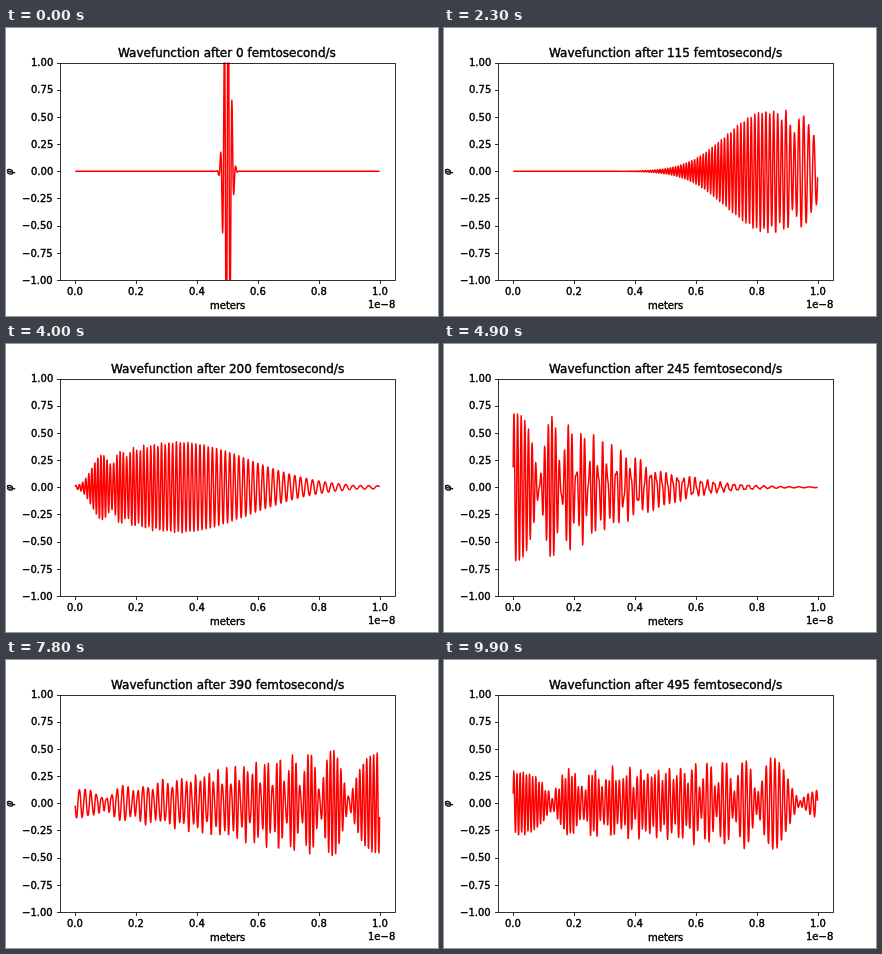
Animation of 432x288 px, one loop 10000 ms. Source, as an HTML page with a canvas:

```html
<!DOCTYPE html>
<html lang="en">
<head>
<meta charset="utf-8">
<title>Wave packet in a box</title>
<style>
html, body { margin: 0; width: 100%; height: 100%; overflow: hidden; background: #fff; }
canvas { display: block; }
</style>
</head>
<body>
<canvas id="stage" width="432" height="288"></canvas>
<script>
const g = document.getElementById('stage').getContext('2d');
const FONT = '"DejaVu Sans", sans-serif';
const LEFT = 54, RIGHT = 388.8, TOP = 34.56, BOTTOM = 252;
const MID_X = (LEFT + RIGHT) / 2, MID_Y = (TOP + BOTTOM) / 2;
const SPAN = (RIGHT - LEFT) / 1.1, X0 = MID_X - SPAN / 2;

// Lengths are in units of the initial packet width; the box is 100 wide.
const N = 1000, STRETCH = (N - 1) / N, K = 5;
const SPREAD = 0.11577 / STRETCH ** 2;   // dispersion per time unit

const snap = v => Math.floor(v + 0.5) + 0.5;
const mapX = u => X0 + SPAN * u;
const mapY = v => MID_Y - v * (BOTTOM - TOP) / 2;

function label(str, x, y, size = 10, align = 0.5, style = '') {
  g.font = `${style} ${size}px ${FONT}`;
  const left = Math.round(x - g.measureText(str).width * align);
  g.fillText(str, left, y);
  g.lineWidth = 0.4;
  g.strokeText(str, left, y);
}

function segment(x1, y1, x2, y2) {
  g.beginPath();
  g.moveTo(x1, y1);
  g.lineTo(x2, y2);
  g.stroke();
}

// Real part of a freely spreading Gaussian packet at distance d from its start
function packet(d, tau) {
  const q = 1 + tau * tau;
  const decay = (d - K * tau) ** 2 / (2 * q);
  if (decay > 16) return 0;
  const phase = (d * d * tau / 2 + K * d - K * K * tau / 2) / q - Math.atan(tau) / 2 + 250;
  return 2 * q ** -0.25 * Math.exp(-decay) * Math.cos(phase);
}

// Hard walls: alternating mirror images of the packet
function wave(y, tau) {
  let sum = 0;
  for (let n = -1; n <= 3; n++) {
    const c = 200 * n - 50;
    sum += packet((c + y) / STRETCH, tau) - packet((c - y) / STRETCH, tau);
  }
  return sum;
}

function drawWave(time) {
  const tau = SPREAD * time;
  g.save();
  g.beginPath();
  g.rect(LEFT, TOP, RIGHT - LEFT, BOTTOM - TOP);
  g.clip();
  g.beginPath();
  for (let i = 0; i < N; i++) {
    g.lineTo(mapX(i / (N - 1)), mapY(wave((i + 0.5) * 100 / N, tau)));
  }
  g.strokeStyle = '#f00';
  g.lineWidth = 1.5;
  g.lineJoin = 'round';
  g.stroke();
  g.restore();
}

function drawAxes() {
  for (let i = 0; i <= 5; i++) {
    const x = mapX(i / 5);
    g.lineWidth = 0.8;
    segment(snap(x), 252.5, snap(x), 256);
    label((i / 5).toFixed(1), x, 267);
  }
  for (let i = -4; i <= 4; i++) {
    const y = mapY(i / 4);
    g.lineWidth = 0.8;
    segment(51, snap(y), 54.5, snap(y));
    label((i / 4).toFixed(2).replace('-', '\u2212'), 47, Math.round(y + 3.7), 10, 1);
  }
  g.lineWidth = 0.8;
  g.strokeRect(54.5, 35.5, 335, 217);
  label('meters', MID_X, 281);
  label('1e\u22128', RIGHT, 280, 10, 1);
  g.save();
  g.translate(7, MID_Y + 1);
  g.rotate(-Math.PI / 2);
  label('\u03c6', 0, 0, 10, 0.5, 'italic');
  g.restore();
}

function draw(time) {
  g.fillStyle = '#fff';
  g.fillRect(0, 0, 432, 288);
  drawWave(time);
  g.fillStyle = g.strokeStyle = '#000';
  drawAxes();
  label(`Wavefunction after ${time} femtosecond/s`, MID_X, 29, 12);
}

let shown = -1;
function tick() {
  const step = Math.floor(performance.now() / 100) % 100;
  if (step !== shown) draw(5 * (shown = step));
  requestAnimationFrame(tick);
}
tick();
</script>
</body>
</html>
```
